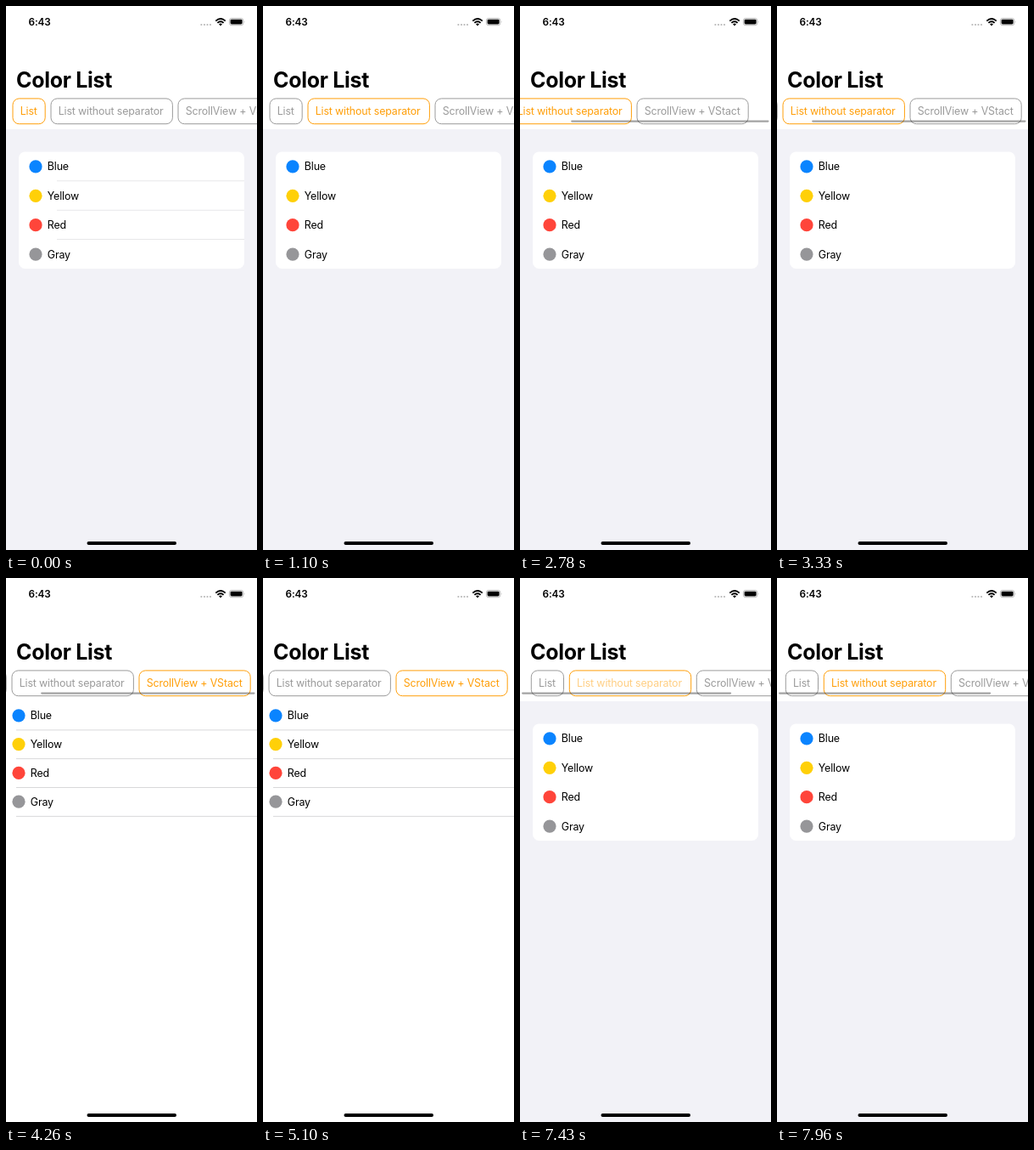
An HTML page that plays this animation: 296x640 px, repeating every 8 s.

```html
<!DOCTYPE html>
<html lang="en">
<head>
<meta charset="utf-8">
<title>Color List</title>
<style>
  html, body { margin: 0; width: 100%; height: 100%; overflow: hidden; background: #fff; }
  svg { display: block; width: 296px; height: 640px; }
  text { font: 12.45px Inter, "Liberation Sans", sans-serif; letter-spacing: -.16px; }
  .title { font-size: 25px; font-weight: 700; letter-spacing: -.3px; }
  .clock { font-size: 11.8px; font-weight: 600; letter-spacing: -.1px; }
  .chip rect { fill: none; stroke: currentColor; }
  .chip text { fill: currentColor; }
</style>
</head>
<body>
<svg viewBox="0 0 296 640">
  <rect width="296" height="640" fill="#fff"/>

  <text class="clock" x="26.5" y="22.7">6:43</text>
  <g fill="#b8b8b8">
    <circle cx="230.4" cy="22" r="1.1"/><circle cx="234" cy="22" r="1.1"/>
    <circle cx="237.5" cy="22" r="1.1"/><circle cx="241" cy="22" r="1.1"/>
  </g>
  <g fill="none" stroke="#000" stroke-width="1.9">
    <path d="M247.3 17.6Q253 12.4 258.7 17.6"/>
    <path d="M249.4 19.9Q253 16.7 256.6 19.9"/>
  </g>
  <path d="M251 21.3Q253 19.8 255 21.3L253 23.4Z"/>
  <rect x="263.4" y="14.5" width="16.4" height="8.2" rx="2.5" fill="none" stroke="#aaa" stroke-width=".8"/>
  <rect x="264.6" y="15.7" width="14" height="5.8" rx="1.4"/>
  <path d="M280.8 17.2q1.2 1.4 0 2.8z" fill="#aaa"/>

  <text class="title" x="12" y="96.4">Color List</text>

  <g id="grouped">
    <rect y="145" width="296" height="495" fill="#f2f2f7"/>
    <rect x="15" y="171.4" width="266" height="137.6" rx="7.6" fill="#fff"/>
    <g id="seps"></g>
  </g>
  <g id="plain"></g>

  <g id="chips"></g>
  <rect id="bar" y="134.4" height="2.3" rx="1.15" fill="#000" fill-opacity=".36"/>
  <rect x="95.5" y="630" width="105.5" height="4" rx="2"/>
</svg>
<script>
const NS = 'http://www.w3.org/2000/svg';
const $ = id => document.getElementById(id);
const LOOP = 8000, MAX = 46;
const ORANGE = '#ff9f0a', GRAY = '#9b9b9b';

function add(parent, tag, attrs, text) {
  const el = document.createElementNS(NS, tag);
  for (const k in attrs) el.setAttribute(k, attrs[k]);
  if (text) el.textContent = text;
  return parent.appendChild(el);
}

const colors = [['Blue', '#0a84ff'], ['Yellow', '#ffd008'], ['Red', '#ff453a'], ['Gray', '#969699']];
function addRows(parent, x, y, pitch) {
  colors.forEach(([name, fill], i) => {
    const cy = y + i * pitch;
    add(parent, 'circle', { cx: x, cy, r: 7.6, fill });
    add(parent, 'text', { x: x + 13.8, y: cy + 4.5 }, name);
  });
}
const line = (parent, x, y, w, fill) => add(parent, 'rect', { x, y, width: w, height: .8, fill });

addRows($('grouped'), 35, 188.9, 34.4);
for (let i = 0; i < 3; i++) line($('seps'), 60, 205.4 + i * 34.4, 221, '#e2e2e4');
addRows($('plain'), 15, 161.8, 33.8);
for (let i = 0; i < 4; i++) line($('plain'), 12, 178.5 + i * 33.8, 284, '#cfcfd1');

const chips = [['List', 8, 38.2], ['List without separator', 53, 143.4], ['ScrollView + VStact', 203, 131.2]]
  .map(([label, x, width]) => {
    const g = add($('chips'), 'g', { class: 'chip' });
    add(g, 'rect', { x, y: 108.9, width, height: 29.8, rx: 7.4 });
    return { g, text: add(g, 'text', { x: x + 8.7, y: 128.4 }, label) };
  });

// Critically damped return to the resting position
const spring = (x, v, s, w = 10) => (x + (v + w * x) * s) * Math.exp(-w * s);
const settle = t => MAX + spring(19, 0, (t - 2780) / 1000);
const bounce = t => -spring(5.3, 800, (t - 7430) / 1000);

// Each track is a list of [start, value]; the last started value holds
const selected = [[0, 0], [670, 1], [3840, 2], [6720, 1]];
const scroll = [
  [0, 0], [2460, 14], [2580, 52],
  ...[2780, 2900, 3010, 3120, 3230].map(t => [t, settle(t)]), [3330, MAX],
  [7330, 28], ...[7430, 7530, 7640, 7750, 7850, 7960].map(t => [t, bounce(t)])
];
const barFade = [[0, 0], [2460, .6], [2580, 1], [4990, .45], [5100, 0], [7330, 1]];
const press = (down, ups) => [[down, .2], ...ups.map((t, i) => [t, [.3, .55, .8, .94, 1][i]])];
const fades = [
  [[0, 1]],
  [[0, 1], ...press(500, [670, 780, 880, 990, 1100]),
    ...press(6550, [6720, 6820, 6930, 7030, 7130]),
    [7330, .2], [7430, .5], [7530, .85], [7640, 1]],
  [[0, 1], ...press(3740, [3840, 3950, 4050, 4150, 4260])]
];
const at = (track, t) => track.reduce((v, [start, next]) => t >= start ? next : v, 0);

function draw(t) {
  const sel = at(selected, t), off = at(scroll, t);
  $('grouped').style.display = sel === 2 ? 'none' : '';
  $('plain').style.display = sel === 2 ? '' : 'none';
  $('seps').style.display = sel ? 'none' : '';
  $('chips').setAttribute('transform', `translate(${-off} 0)`);
  chips.forEach((c, i) => {
    c.g.style.color = i === sel ? ORANGE : GRAY;
    c.text.style.opacity = at(fades[i], t);
  });
  const left = 2 + Math.max(0, Math.min(off, MAX)) * .85 + Math.max(0, off - MAX);
  const right = 254.5 + Math.max(0, Math.min(off, MAX)) * .85 + Math.min(0, off);
  $('bar').setAttribute('x', left);
  $('bar').setAttribute('width', Math.min(294, right) - left);
  $('bar').style.opacity = at(barFade, t);
}

const t0 = performance.now();
function tick(now) {
  draw(Math.max(0, now - t0) % LOOP);
  requestAnimationFrame(tick);
}
draw(0);
requestAnimationFrame(tick);
</script>
</body>
</html>
```
